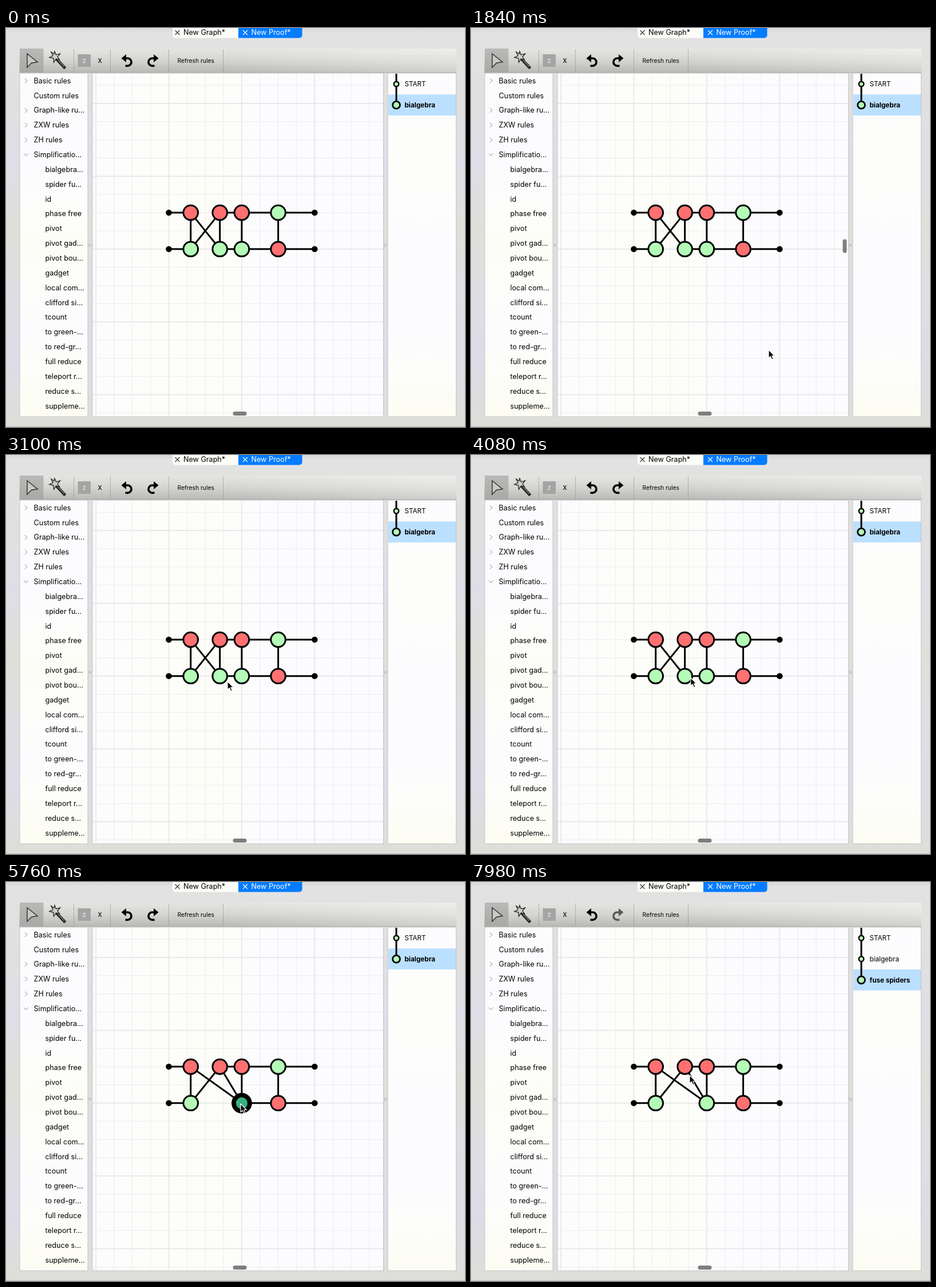
These frames come from a looping animation (802x698 px, 8 s). An HTML page with a canvas:

```html
<!DOCTYPE html>
<html>
<head>
<meta charset="utf-8">
<style>
  html, body { margin: 0; width: 100%; height: 100%; overflow: hidden; background: #e0e0e0; }
  canvas { display: block; width: 802px; height: 698px; }
</style>
</head>
<body>
<canvas id="stage" width="802" height="698"></canvas>
<script>
const ctx = document.getElementById('stage').getContext('2d');
const LOOP = 8000, PRESS = 4650, HOVER = 5350, FUSE = 6050;
const UNIT = 63.7, LEFT = 284.5, BOTTOM = 386.8, TOP = BOTTOM - UNIT;
const RED = '#ff7071', GREEN = '#b3fbb6', DARK = '#38b080';

const RULES = ['Basic rules', 'Custom rules', 'Graph-like ru...', 'ZXW rules', 'ZH rules', 'Simplificatio...',
  'bialgebra...', 'spider fu...', 'id', 'phase free', 'pivot', 'pivot gad...', 'pivot bou...', 'gadget',
  'local com...', 'clifford si...', 'tcount', 'to green-...', 'to red-gr...', 'full reduce', 'teleport r...',
  'reduce s...', 'suppleme...'];

// Grid column, row (0 = top), fill; no fill means a boundary dot
const NODES = {
  inA: [0, 0], a1: [.6, 0, RED], a2: [1.4, 0, RED], a3: [2, 0, RED], a4: [3, 0, GREEN], outA: [4, 0],
  inB: [0, 1], b1: [.6, 1, GREEN], b3: [2, 1, GREEN], b2: [1.4, 1, GREEN], b4: [3, 1, RED], outB: [4, 1]
};
const EDGES = ('inA-a1 a1-b1 a1-b2 a2-b1 a2-b2 a2-a3 a3-a4 a4-outA ' +
  'inB-b1 b2-b3 a3-b3 b3-b4 a4-b4 b4-outB').split(' ').map(e => e.split('-'));

// Pointer track: time, x, y
const POINTER = [[1150, 592, 720], [1800, 520, 563], [1900, 520, 563], [2700, 390, 399], [3000, 387, 396],
  [3500, 387, 396], [4300, 383, 388], [4650, 383, 388], [4920, 389, 388], [5400, 410, 388],
  [6100, 410, 388], [6500, 405, 380], [7000, 405, 380], [7700, 382, 338]];

const clamp = v => Math.max(0, Math.min(1, v));
const smooth = v => v * v * (3 - 2 * v);

function pointerAt(t) {
  const i = POINTER.findIndex(p => p[0] > t);
  if (i === 0) return null;
  if (i < 0) return POINTER[POINTER.length - 1].slice(1);
  const [a, b] = [POINTER[i - 1], POINTER[i]];
  const k = smooth((t - a[0]) / (b[0] - a[0]));
  return [a[1] + (b[1] - a[1]) * k, a[2] + (b[2] - a[2]) * k];
}

function gradient(x0, y0, x1, y1, ...colors) {
  const g = ctx.createLinearGradient(x0, y0, x1, y1);
  colors.forEach((c, i) => g.addColorStop(i / (colors.length - 1), c));
  return g;
}
function rect(x, y, w, h, fill, radius = 0) {
  ctx.fillStyle = fill;
  ctx.beginPath();
  ctx.roundRect(x, y, w, h, radius);
  ctx.fill();
}
function path(d, fill, stroke, width = 1) {
  const p = new Path2D(d);
  if (fill) { ctx.fillStyle = fill; ctx.fill(p); }
  if (stroke) { ctx.strokeStyle = stroke; ctx.lineWidth = width; ctx.stroke(p); }
}
function circle(x, y, r, fill, width = 0) {
  ctx.beginPath();
  ctx.arc(x, y, r, 0, 7);
  ctx.fillStyle = fill;
  ctx.fill();
  if (width) { ctx.strokeStyle = '#000'; ctx.lineWidth = width; ctx.stroke(); }
}
function text(s, x, y, size, color = '#000', weight = 400) {
  ctx.font = `${weight} ${size}px Inter, sans-serif`;
  ctx.fillStyle = color;
  ctx.fillText(s, x, y);
}
function panel(x, w, fill) {
  rect(x - .5, 78.5, w + 1, 602, '#c4c4c6');
  rect(x + .5, 79.5, w - 1, 600, fill);
}

function drawWindow() {
  rect(0, 0, 802, 698, gradient(0, 0, 0, 698, '#e2e2e3', '#e1e0de', '#dfdee8', '#dfdfd9', '#dfdee3', '#dddce7', '#deded8'));
  rect(0, 0, 802, 6, '#dcdcdc');
  rect(0, 697, 802, 1, '#bcbcbc');
  rect(291, -8, 226, 25.5, '#fcfcf8', 5);
  rect(406, -8, 111.5, 25.5, '#057cff', [0, 0, 5, 0]);
  path('M295.5 4l8 8m0-8l-8 8', null, '#333', 1.1);
  path('M414 4l8 8m0-8l-8 8', null, '#fff', 1.1);
  text('New Graph*', 310, 12.3, 12.6);
  text('New Proof*', 428.5, 12.3, 12.6, '#fff');
}

function drawTurn() {
  path('M208 53h4.5a6.6 6.6 0 0 1 0 13.2h-4', null, ctx.strokeStyle, 3.6);
  path('M201.5 53l8.5-7v14z', ctx.strokeStyle);
}
function drawToolbar(canRedo) {
  rect(23, 36, 764, 42, gradient(0, 36, 0, 78, '#e5e5e1', '#d4d4d0', '#b8b8b5'));
  rect(380, 36, 407, 42, gradient(380, 0, 787, 0, '#fff0', '#ffffff55'));
  rect(24, 36, 41.5, 42, gradient(0, 36, 0, 78, '#b9b9b7', '#a8a8a6'));
  rect(23, 77.5, 764, 1, '#a6a6a4');
  ctx.setLineDash([1.5, 2]);
  for (const x of [118.5, 182.5, 284.5, 379.5]) path(`M${x} 38V77`, null, '#777', 1);
  ctx.setLineDash([]);

  path('M37 45l18 14.5l-10.5 1.7l-7.5 7.8z', '#c8c8c6', '#333', 1.5);
  path('M88 54l15.5 16.5', null, '#222', 5);
  path('M90 55l12 13', null, '#888', 1.3);
  path('M85 41l2.5 6l7-2l-4.500 5.500l3.500 5l-6-1.500l-4 6l-.5-7l-7-1.500l6-3l-3-6.500l5 3.500z', '#d0d0cc', '#222', 1.3);

  rect(125.5, 46, 22.5, 22, '#a4a4a4', 1);
  text('Z', 133.5, 60.5, 9.5, '#eee', 500);
  text('X', 160.5, 60.5, 10, '#000', 500);

  ctx.strokeStyle = '#000';
  drawTurn();
  ctx.save();
  ctx.translate(468, 0);
  ctx.scale(-1, 1);
  ctx.strokeStyle = canRedo ? '#000' : '#585858';
  drawTurn();
  ctx.restore();
  text('Refresh rules', 299.5, 61, 10.3);
}

function drawRules() {
  panel(24, 119, gradient(0, 79, 0, 680, '#fcfcff', '#fcfcff', '#fdfdf7', '#fcfcfe', '#fdfdf3'));
  RULES.forEach((name, i) => {
    const y = 92.2 + i * 25.86;
    text(name, i < 6 ? 48.500 : 68.5, y + 4.5, 12.6);
    if (i === 5) path(`M31 ${y - 2}l3.800 4l3.800-4`, null, '#888', 1);
    else if (i < 5 && i !== 1) path(`M33 ${y - 4}l4 4l-4 4`, null, '#888', 1);
  });
  circle(146.7, 380, 2.7, '#c9c9ce');
  circle(663, 380, 2.7, '#c9c9ce');
}

function drawSteps(fused) {
  panel(667, 119.5, gradient(0, 79, 0, 680, '#fcfcff', '#fdfdf9', '#fcfcff', '#fcfcff', '#fdfdf4'));
  const steps = fused ? ['START', 'bialgebra', 'fuse spiders'] : ['START', 'bialgebra'];
  const last = steps.length - 1, rowY = i => 98 + i * 36.7;
  rect(668, rowY(last) - 18.4, 118, 36.7, '#bbe0ff');
  path(`M682 80V${rowY(last)}`, null, '#000', 3);
  steps.forEach((name, i) => {
    const current = i === last;
    circle(682, rowY(i), current ? 6.4 : 4.3, GREEN, current ? 2.8 : 2.4);
    text(name, 696.5, rowY(i) + 4.2, 11.7, '#000', current ? 700 : 400);
  });
}

function drawGrid() {
  panel(151, 508.5, gradient(151, 0, 659, 0, '#fcfcff', '#fdfdfa', '#fdfdf8', '#fcfcff', '#fcfcff', '#fcfcff'));
  const step = UNIT / 2;
  const lines = (origin, from, to, draw) => {
    for (let i = Math.ceil((from - origin) / step); origin + i * step < to; i++) {
      draw(origin + i * step, i % 4 === 0 ? 2 : 1);
    }
  };
  const color = w => w > 1 ? '#e9e9eb' : '#ececee';
  lines(LEFT, 152, 658, (x, w) => path(`M${x} 80V680`, null, color(w), w));
  lines(BOTTOM, 80, 680, (y, w) => path(`M152 ${y}H659`, null, color(w), w));
}

function draggedX(t, pointer) {
  if (t < PRESS) return LEFT + 1.4 * UNIT;
  if (t >= HOVER) return LEFT + 2 * UNIT;
  const snap = UNIT / 10;
  return LEFT + Math.round((pointer[0] - 9 - LEFT) / snap) * snap;
}

function drawGraph(t, pointer) {
  const fused = t >= FUSE, dragging = t >= PRESS && !fused;
  const at = id => [id === 'b2' ? draggedX(t, pointer) : LEFT + NODES[id][0] * UNIT, NODES[id][1] ? BOTTOM : TOP];
  ctx.lineCap = 'round';
  for (const [a, b] of EDGES) path(`M${at(a)}L${at(b)}`, null, '#000', 3);
  ctx.lineCap = 'butt';

  // The drop spot swells while hovered and springs back once fused
  const grow = smooth(clamp((t - HOVER) / 100));
  const settle = clamp((t - FUSE) / 300);
  const swell = fused ? .25 * (1 - settle) * Math.cos(settle * 9) : .25 * grow;

  for (const id in NODES) {
    const [x, y] = at(id), fill = NODES[id][2];
    if (!fill) circle(x, y, 5.3, '#000');
    else if (id === 'b2' && fused) continue;
    else if (id === 'b2' && dragging) circle(x, y, 12.6, DARK, 5);
    else {
      const scale = id === 'b3' ? 1 + swell : 1;
      circle(x, y, 12.8 * scale, fill, 3 * scale);
    }
  }
}

function drawPointer([x, y]) {
  ctx.save();
  ctx.translate(x, y);
  ctx.lineJoin = 'round';
  path('M0 0V14.500L3.400 11.400L5.800 17L8.200 16L5.900 10.500H10.300Z', '#000', '#fff', 1.2);
  ctx.restore();
}

function draw(t) {
  const pointer = pointerAt(t), fused = t >= FUSE;
  drawWindow();
  drawToolbar(!fused);
  drawRules();
  drawSteps(fused);
  drawGrid();
  drawGraph(t, pointer);
  rect(396.5, 671, 24, 7, '#7e7e7e', 3.5);
  if (t > 1450 && t < 2350) rect(649.5, 369.5, 7, 24, '#7e7e7e', 3.5);
  if (pointer) drawPointer(pointer);
}

const start = performance.now();
function frame() {
  draw((performance.now() - start) % LOOP);
  requestAnimationFrame(frame);
}
frame();
</script>
</body>
</html>
```
